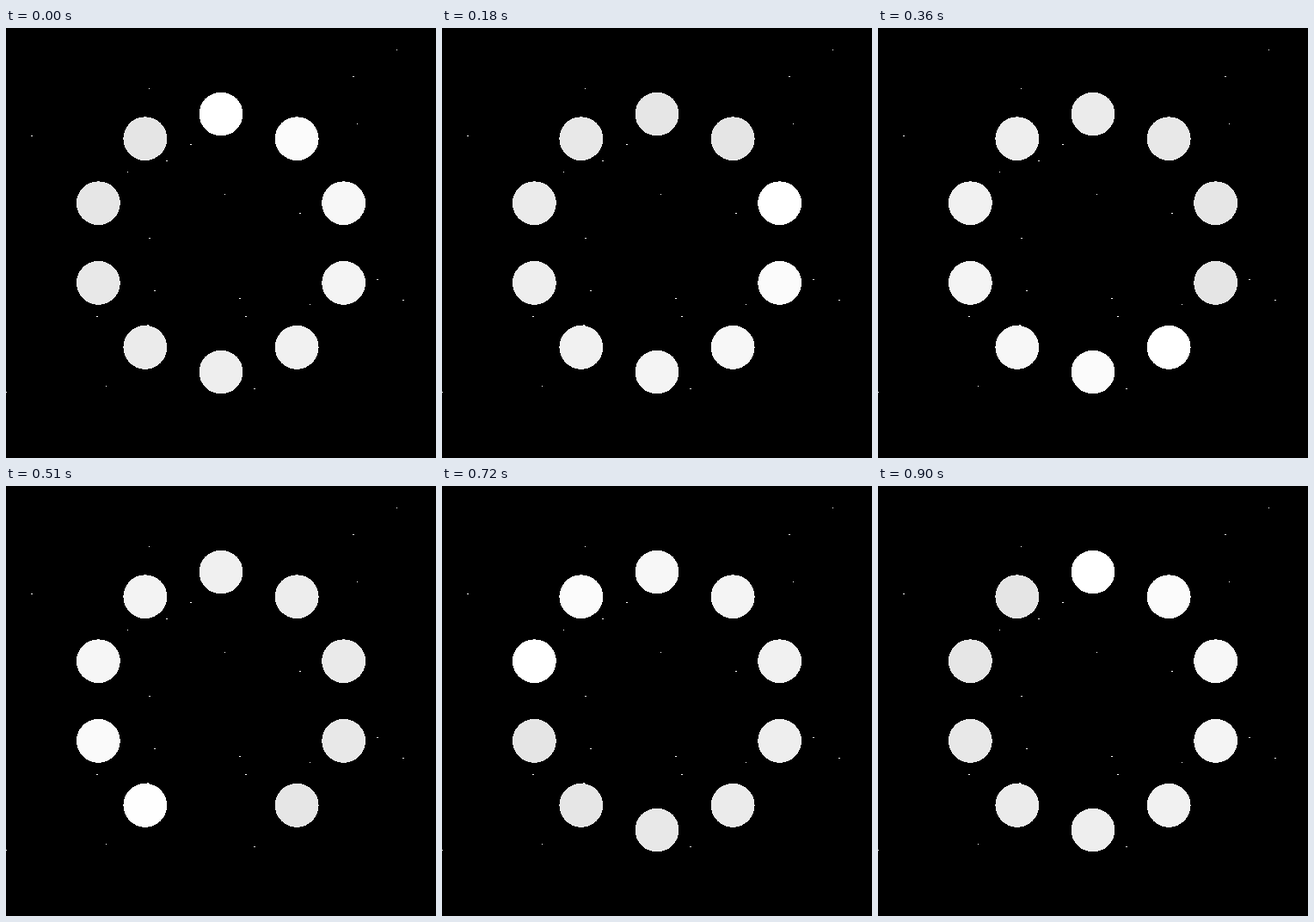
Animation of 500x500 px, one loop 930 ms. Source, as an HTML page:

```html
<!DOCTYPE html>
<html>
<head>
<meta charset="utf-8">
<style>
html, body { margin: 0; height: 100%; overflow: hidden; background: #000; }
svg { display: block; width: 100vw; height: 100vh; }
</style>
</head>
<body>
<svg viewBox="0 0 500 500">
  <!-- Hardens the edges: every clearly touched pixel becomes opaque -->
  <filter id="hard" x="0" y="0" width="500" height="500"
          filterUnits="userSpaceOnUse" color-interpolation-filters="sRGB">
    <feComponentTransfer><feFuncA type="linear" slope="20" intercept="-1"/></feComponentTransfer>
  </filter>
  <g id="specks" fill="#fff"></g>
  <g id="dots" filter="url(#hard)"></g>
</svg>
<script>
const COUNT = 10, STEP = 30, TURN = 30, LOOP = 930;

function add(parent, tag, attrs) {
  const el = document.createElementNS('http://www.w3.org/2000/svg', tag);
  for (const key in attrs) el.setAttribute(key, attrs[key]);
  return document.getElementById(parent).appendChild(el);
}

let seed = 7;
function random(n) {
  seed = (seed * 16807) % 2147483647;
  return Math.floor(seed / 2147483647 * n);
}

// Stray light pixels on the black ground
for (let i = 0; i < 23; i++) {
  add('specks', 'rect', { x: random(500), y: random(460), width: 1 + random(2), height: 1 });
}

const dots = Array.from({ length: COUNT }, (_, i) => {
  const angle = i / COUNT * 2 * Math.PI;
  return add('dots', 'circle', {
    cx: 250 + 150 * Math.sin(angle),
    cy: 250 - 150 * Math.cos(angle),
    r: 25
  });
});

// Each dot vanishes once the head has passed, returns grey and brightens to white
function draw() {
  const tick = Math.floor(performance.now() % LOOP / STEP);
  dots.forEach((dot, i) => {
    const age = (tick - i * TURN / COUNT + TURN) % TURN || TURN;
    const grey = Math.round(228 + 27 * (age / TURN) ** 1.5);
    dot.setAttribute('visibility', age < 3 ? 'hidden' : 'visible');
    dot.setAttribute('fill', `rgb(${grey},${grey},${grey})`);
  });
  requestAnimationFrame(draw);
}
draw();
</script>
</body>
</html>
```
